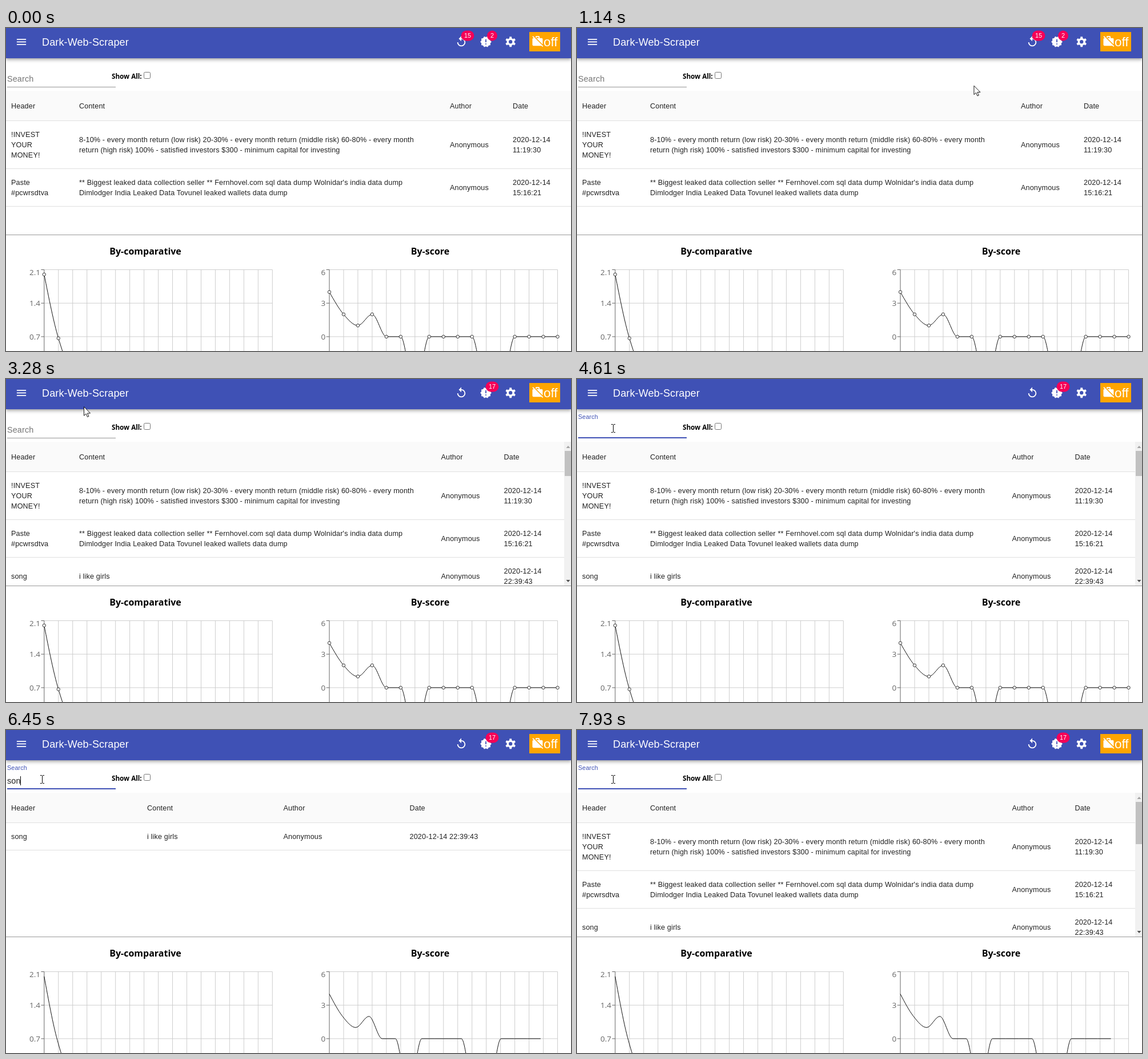
Animation of 989 by 566 pixels, one loop 8 s. Source, as an HTML page:

```html
<!DOCTYPE html>
<html lang="en">
<head>
<meta charset="utf-8">
<title>Dark-Web-Scraper</title>
<style>
html, body { margin: 0; width: 100%; height: 100%; overflow: hidden; background: #fff; }
#bar {
  position: absolute; left: 0; top: 0; width: 989px; height: 53px; background: #3f51b5;
  box-shadow: 0 2px 4px -1px rgba(0,0,0,.2), 0 4px 5px rgba(0,0,0,.14), 0 1px 9px rgba(0,0,0,.12);
}
svg { position: absolute; left: 0; top: 0; display: block; overflow: hidden; }
text { font-family: "Liberation Sans", Arial, sans-serif; white-space: pre; }
.bold { font-family: "Open Sans", sans-serif; font-weight: 700; fill: #000; }
.tick { font-family: "Open Sans", sans-serif; font-size: 13.5px; fill: #666; text-anchor: end; }
.cell { font-size: 12.6px; letter-spacing: .155px; fill: #212121; }
.badge { font-size: 10.8px; fill: #fff; text-anchor: middle; }
</style>
</head>
<body>
<div id="bar"></div>
<svg id="stage" width="989" height="566" viewBox="0 0 989 566"></svg>
<script>
const LOOP = 8000;
const svg = document.getElementById('stage');
const clamp = v => Math.max(0, Math.min(1, v));

// ---- markup helpers ----
const rect = (x, y, w, h, fill, more = '') =>
  `<rect x="${x}" y="${y}" width="${w}" height="${h}" fill="${fill}" ${more}/>`;
const text = (x, y, s, more = 'class="cell"') => `<text x="${x}" y="${y}" ${more}>${s}</text>`;
const lines = (x, y, list) => list.map((s, i) => text(x, y + 18 * i, s)).join('');
const icon = (x, y, body) => `<g transform="translate(${x} ${y}) scale(.9)" fill="#fff">${body}</g>`;
const badge = (id, x, w, s) =>
  `<g id="${id}">${rect(x - w / 2, 4.5, w, 18, '#f50057', 'rx="9"')}${text(x, 17.4, s, 'class="badge"')}</g>`;

// ---- app bar ----
function gear() {
  let s = '<circle cx="12" cy="12" r="5.4" fill="none" stroke="#fff" stroke-width="3.8"/>';
  for (let a = 0; a < 360; a += 60)
    s += `<path d="M9.8 6L10.2 2.2H13.8L14.2 6Z" stroke="#fff" stroke-width=".5" transform="rotate(${a} 12 12)"/>`;
  return s;
}
function appBar() {
  return icon(16.2, 13.5, '<path d="M3 18h18v-2H3zM3 13h18v-2H3zM3 6v2h18V6z"/>') +
    text(63, 31, 'Dark-Web-Scraper', 'font-size="18" letter-spacing=".135" fill="#fff"') +
    '<circle id="hover" cx="797" cy="24" r="21.6"/>' +
    icon(786.2, 13.4, '<path d="M12 5V1L7 6l5 5V7c3.31 0 6 2.69 6 6s-2.69 6-6 6-6-2.69-6-6H4c0 4.42 3.58 8 8 8s8-3.58 8-8-3.58-8-8-8z"/>') +
    icon(829.2, 13.4, '<path d="M23 12l-2.44-2.78.34-3.68-3.61-.82-1.89-3.18L12 3 8.6 1.54 6.71 4.72l-3.61.81.34 3.68L1 12l2.44 2.78-.34 3.69 3.61.82 1.89 3.18L12 21l3.4 1.46 1.89-3.18 3.61-.82-.34-3.68zM13 17h-2v-2h2zM13 13h-2V7h2z"/>') +
    icon(872.4, 13.4, gear()) +
    rect(916, 7, 54, 34, '#ffa500') +
    icon(919.6, 12.3, '<path d="M23 21.74L3.25 1.99 1.99 3.25l2.7 2.7h-.64c-1.11 0-1.99.89-1.99 2l-.01 11c0 1.11.89 2 2 2h15.64L21.74 23zM22 7.95c.05-1.11-.84-2-1.95-1.95h-4V3.95c0-1.11-.89-2-2-1.95h-4c-1.11-.05-2 .84-2 1.95v.32l13.95 14zM14.05 6H10V3.95h4.05z"/>') +
    text(941, 31.5, 'off', 'font-size="22.5" fill="#fff"') +
    badge('fresh', 808, 22.8, '15') + badge('few', 851, 18, '2') + badge('many', 851, 22.8, '17');
}

// ---- search field ----
function searchField() {
  return '<text id="label" x="2">Search</text>' +
    '<text id="typed" x="2" y="94" font-size="14.4" letter-spacing=".135" fill="#212121"></text>' +
    rect(0, 81, 1, 16, '#000', 'id="caret"') +
    rect(2, 103, 190, 1, '#000', 'fill-opacity=".42"') +
    rect(2, 102, 190, 2, '#212121', 'id="thick"') +
    rect(2, 102, 190, 2, '#3f51b5', 'id="focus"') +
    text(185, 88.5, 'Show All:', 'class="bold" font-size="11.7"') +
    rect(241.5, 77.5, 11, 11, '#fff', 'stroke="#767676" rx="2"');
}

// ---- tables ----
const rule = y => rect(0, y, 989, 1, '#e0e0e0');
const heads = xs => ['Header', 'Content', 'Author', 'Date'].map((s, i) => text(xs[i], 141, s)).join('');
const tableHead = rect(0, 110, 989, 52, '#fafafa') + rule(162);
function pastes(author, date) {
  return heads([9, 128, author, date]) +
    lines(9, 191, ['!INVEST', 'YOUR', 'MONEY!']) +
    lines(128, 200, [
      '8-10% - every month return (low risk) 20-30% - every month return (middle risk) 60-80% - every month',
      'return (high risk) 100% - satisfied investors $300 - minimum capital for investing']) +
    text(author, 209, 'Anonymous') + lines(date, 200, ['2020-12-14', '11:19:30']) + rule(246) +
    lines(9, 275, ['Paste', '#pcwrsdtva']) +
    lines(128, 275, [
      "** Biggest leaked data collection seller ** Fernhovel.com sql data dump Wolnidar's india data dump",
      'Dimlodger India Leaked Data Tovunel leaked wallets data dump']) +
    text(author, 284, 'Anonymous') + lines(date, 275, ['2020-12-14', '15:16:21']) + rule(312);
}
function tables() {
  return tableHead + rect(0, 163, 989, 83, '#c8c8c8', 'id="row"') +
    `<g id="short">${pastes(777, 887)}</g>` +
    `<g id="long">${pastes(761.5, 871.5)}${text(9, 350, 'song')}${text(128, 350, 'i like girls')}` +
    text(761.5, 350, 'Anonymous') + lines(871.5, 341, ['2020-12-14', '22:39:43']) +
    rect(977, 110, 12, 252, '#f1f1f1') + rect(978, 126, 11, 44, '#c1c1c1', 'id="thumb"') +
    '<path d="M980.5 121h7l-3.5-4z" fill="#a3a3a3"/><path d="M980.5 352h7l-3.5 4z" fill="#505050"/></g>' +
    `<g id="found">${heads([9, 247, 485.5, 706.5])}${text(9, 191, 'song')}${text(247, 191, 'i like girls')}` +
    text(485.5, 191, 'Anonymous') + text(706.5, 191, '2020-12-14 22:39:43') + rule(210) + '</g>' +
    rect(0, 362, 989, 1, '#9a9a9a');
}

// ---- charts ----
const STEP = 24.97, TOP = 423.5, GAP = 58.7;
const charts = [
  { id: 'comp', x: 66.8, title: 'By-comparative', mid: 244, ticks: ['2.1', '1.4', '0.7'],
    ys: [2, .667, .02].concat(Array(14).fill(0)).map(v => TOP + (2.1 - v) / .7 * GAP) },
  { id: 'score', x: 566, title: 'By-score', mid: 742.5, ticks: ['6', '3', '0'],
    ys: [4, 2, 1, 2, 0, 0, -5, 0, 0, 0, 0, -5, -5, 0, 0, 0, 0].map(v => TOP + (6 - v) / 3 * GAP) }
];
function chart(c) {
  const right = c.x + 16 * STEP;
  let grid = '', axis = `M${c.x} ${TOP}V570`, s = '';
  for (let i = 1; i <= 16; i++) grid += `M${c.x + i * STEP} ${TOP}V570`;
  c.ticks.forEach((label, i) => {
    const y = TOP + i * GAP;
    grid += `M${c.x} ${y}H${right}`;
    axis += `M${c.x - 5.4} ${y}H${c.x}`;
    s += text(c.x - 6.8, i ? y + 4.8 : 433.3, label, 'class="tick"');
  });
  const dots = c.ys.map((y, i) => `<circle cx="${c.x + i * STEP}" cy="${y}" r="2.7"/>`).join('');
  return text(c.mid, 397, c.title, 'class="bold" font-size="16" text-anchor="middle"') + s +
    `<path d="${grid}" stroke="#ccc" stroke-width=".95"/><path d="${axis}" stroke="#666"/>` +
    `<path id="${c.id}" fill="none" stroke="#111"/>` +
    `<g class="dots" fill="#fff" stroke="#222" stroke-width=".9">${dots}</g>`;
}
// Monotone cubic through evenly spaced points
function curve(x0, h, ys) {
  const n = ys.length - 1, s = [], m = [];
  for (let i = 0; i < n; i++) s.push((ys[i + 1] - ys[i]) / h);
  for (let i = 1; i < n; i++) {
    const a = s[i - 1], b = s[i];
    m[i] = (Math.sign(a) + Math.sign(b)) * Math.min(Math.abs(a), Math.abs(b), Math.abs(a + b) / 4);
  }
  m[0] = (3 * s[0] - m[1]) / 2;
  m[n] = (3 * s[n - 1] - m[n - 1]) / 2;
  let d = `M${x0} ${ys[0]}`;
  for (let i = 0; i < n; i++) {
    const x = x0 + i * h, e = h / 3;
    d += `C${x + e} ${ys[i] + m[i] * e} ${x + h - e} ${ys[i + 1] - m[i + 1] * e} ${x + h} ${ys[i + 1]}`;
  }
  return d;
}

// ---- pointer ----
const pointer = '<circle id="press" r="13" fill="#ffd400" fill-opacity=".5"/><g id="pointer">' +
  '<path id="arrow" d="M0 0V15.5L3.6 12.2L6 17.8L8.4 16.8L6 11.3H11Z" fill="#fff" stroke="#000" stroke-width=".9"/>' +
  '<g id="hand" fill="#fff" stroke="#000"><path d="M-1.5 1Q0-1.5 1.5 1V7Q3 5.8 4.3 7.3Q6 6.3 7 8Q9 7.4 9.5 9.3V13L8 16V19.5H-.5V17L-5.2 11.5Q-5 9-3 10.2L-1.5 12Z"/>' +
  '<path d="M1.5 6V10M4.3 7.3V10.5M7 8V11" fill="none"/></g>' +
  '<path id="beam" d="M-3 -6.5H-.5L.5 -5.5L1.5 -6.5H4M.5 -6V7M-3 7.5H-.5L.5 6.5L1.5 7.5H4" fill="none" stroke="#000"/></g>';

svg.innerHTML = appBar() + searchField() + tables() + charts.map(chart).join('') + pointer;
const el = {};
svg.querySelectorAll('[id]').forEach(e => el[e.id] = e);
const dotGroups = svg.querySelectorAll('.dots');

// ---- timeline ----
const path = [
  [520, 748, 456], [589, 748, 456], [590, 732, 202], [689, 732, 202], [690, 724, 140], [759, 724, 140],
  [760, 718, 132], [909, 718, 132], [1150, 694, 100], [1400, 728, 62], [1690, 795, 24], [1830, 803, 19],
  [2240, 803, 19], [2600, 560, 34], [2890, 262, 36], [2970, 243, 27], [3300, 130, 50], [3590, 34, 69],
  [3740, 50, 79], [3900, 63, 86], [LOOP, 63, 86]
];
const typing = [[0, ''], [5880, 's'], [6120, 'so'], [6350, 'son'], [6580, 'song'],
  [7520, 'son'], [7660, 'so'], [7790, 's'], [7930, '']];
const views = [[0, 'short'], [2400, 'long', 44], [5880, 'long', 74], [6120, 'found'], [7860, 'long', 74]];
const redraws = [[-LOOP], [5880], [6120], [6350], [6580], [7520], [7660], [7860]];

const last = (list, t) => list.filter(e => e[0] <= t).pop();
const show = (e, on) => e.setAttribute('visibility', on ? 'visible' : 'hidden');
const set = (e, o) => { for (const k in o) e.setAttribute(k, o[k]); };

function along(t) {
  const i = Math.max(1, path.findIndex(p => p[0] > t));
  const a = path[i - 1], b = path[i], p = clamp((t - a[0]) / (b[0] - a[0]));
  return [a[1] + (b[1] - a[1]) * p, a[2] + (b[2] - a[2]) * p];
}

function drawPointer(t) {
  const [x, y] = along(t), on = t >= 520;
  const hand = (t >= 590 && t < 690) || (t >= 1690 && t < 2300), beam = t >= 3740;
  set(el.pointer, { transform: `translate(${x} ${y})` });
  show(el.hand, on && hand);
  show(el.beam, on && beam);
  show(el.arrow, on && !hand && !beam);
  set(el.press, { cx: x, cy: y + (beam ? 0 : 2) });
  show(el.press, (t >= 2150 && t < 2240) || (t >= 4120 && t < 4200));
  show(el.row, t >= 590 && t < 690);
  set(el.hover, { 'fill-opacity': .06 * (clamp((t - 1690) / 140) - clamp((t - 2300) / 150)) });
}

function drawBadges(t) {
  const k = 1 - clamp((t - 2240) / 195);
  set(el.fresh, { transform: `translate(${808 * (1 - k)} ${13.5 * (1 - k)}) scale(${k})` });
  show(el.few, t < 2400);
  show(el.many, t >= 2400);
}

function drawSearch(t) {
  const [at, word] = last(typing, t), p = clamp((t - 4120) / 200), e = p * p * (3 - 2 * p);
  set(el.label, { y: 94 - 24 * e, 'font-size': 14.4 - 3.6 * e, 'letter-spacing': .135 - .034 * e,
    fill: t < 4120 ? '#757575' : '#3f51b5' });
  set(el.thick, { 'fill-opacity': clamp((t - 3740) / 160) });
  set(el.focus, { x: 97 - 95 * e, width: 190 * e });
  el.typed.textContent = word;
  set(el.caret, { x: word ? Math.floor(2 + el.typed.getComputedTextLength()) : 2 });
  const blink = Math.floor((t - (at || 4060)) / 550) % 2 === 0;
  show(el.caret, t >= 4120 && t < 7930 && blink);
}

function drawTable(t) {
  const [, name, thumb] = last(views, t);
  for (const id of ['short', 'long', 'found']) show(el[id], id === name);
  if (thumb) set(el.thumb, { height: thumb });
}

function drawCharts(t) {
  const p = clamp((t - last(redraws, t)[0]) / 800), k = .915 + .085 * p;
  for (const c of charts) set(el[c.id], { d: curve(c.x, STEP * k, c.ys) });
  dotGroups.forEach(g => show(g, p === 1));
}

function frame() {
  const t = performance.now() % LOOP;
  drawPointer(t);
  drawBadges(t);
  drawSearch(t);
  drawTable(t);
  drawCharts(t);
  requestAnimationFrame(frame);
}
frame();
</script>
</body>
</html>
```
